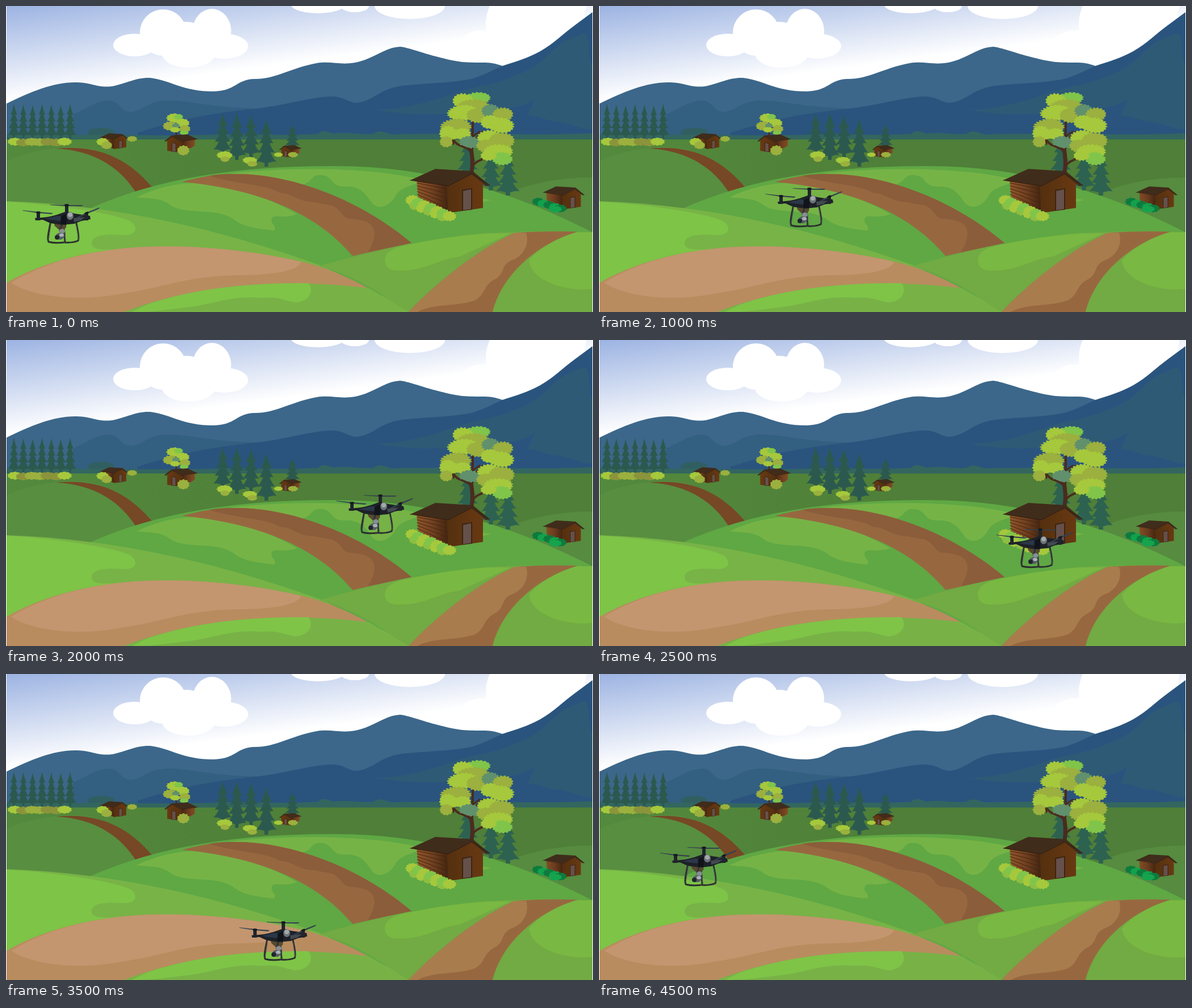
An HTML page with a canvas that plays this animation: 1035x541 px, repeating every 5000 ms.

```html
<!DOCTYPE html>
<html lang="en">
<head>
<meta charset="utf-8">
<title>Drone over the valley</title>
<style>
html, body { margin: 0; width: 100%; height: 100%; overflow: hidden; background: #fff; }
canvas { display: block; }
</style>
</head>
<body>
<canvas id="stage" width="1035" height="541"></canvas>
<script>
const W = 1035, H = 541, STEP = 500;
const ctx = document.getElementById('stage').getContext('2d');
const scene = document.createElement('canvas');
scene.width = W;
scene.height = H;
let g = scene.getContext('2d');

const fill = (color, d) => { g.fillStyle = color; g.fill(new Path2D(d)); };
const line = (color, width, d) => {
  g.strokeStyle = color;
  g.lineWidth = width;
  g.stroke(new Path2D(d));
};
const oval = (color, x, y, rx, ry, turn = 0) => {
  g.fillStyle = color;
  g.beginPath();
  g.ellipse(x, y, rx, ry, turn, 0, Math.PI * 2);
  g.fill();
};
const gradient = (x0, y0, x1, y1, ...colors) => {
  const grad = g.createLinearGradient(x0, y0, x1, y1);
  colors.forEach((c, i) => grad.addColorStop(i / (colors.length - 1), c));
  return grad;
};

// Leafy blob with a scalloped edge
function clump(color, x, y, rx, ry) {
  const n = Math.max(9, Math.round((rx + ry) / 2));
  g.fillStyle = color;
  g.beginPath();
  for (let i = 0; i <= n; i++) {
    const a = i / n * Math.PI * 2, m = a - Math.PI / n;
    const k = 0.87 + 0.06 * Math.sin(i % n * 7 + x);
    const px = x + Math.cos(a) * rx * k, py = y + Math.sin(a) * ry * k;
    if (i) g.quadraticCurveTo(x + Math.cos(m) * rx * 1.2, y + Math.sin(m) * ry * 1.2, px, py);
    else g.moveTo(px, py);
  }
  g.fill();
}
const clumps = list => list.forEach(c => clump(...c));

function pine(x, top, bottom, w, color = '#2c594e') {
  const h = bottom - top, tiers = 4;
  g.fillStyle = color;
  g.fillRect(x - w * 0.09, bottom - h * 0.2, w * 0.18, h * 0.2);
  for (let i = 0; i < tiers; i++) {
    const y0 = top + h * 0.15 * i, y1 = top + h * (0.31 + 0.195 * i);
    const r = w * (0.27 + 0.077 * i);
    g.beginPath();
    g.moveTo(x, y0);
    g.quadraticCurveTo(x + r * 0.45, y1 - h * 0.1, x + r, y1);
    g.lineTo(x + r * 0.6, y1);
    g.lineTo(x, y1 + h * 0.04);
    g.lineTo(x - r * 0.6, y1);
    g.lineTo(x - r, y1);
    g.quadraticCurveTo(x - r * 0.45, y1 - h * 0.1, x, y0);
    g.fill();
  }
}

// Log cabin, 140 x 78 units, door on the right unless mirrored
function house(x, y, s, mirror) {
  g.save();
  g.translate(x, y);
  g.scale(mirror ? -s : s, s);
  fill(gradient(12, 0, 68, 0, '#925529', '#6f4020', '#40230f'), 'M11 20L66 27L67 77L14 50Z');
  for (let i = 1; i < 6; i++) {
    line('#452512', 1, `M12 ${20 + i * 5}L66 ${27 + i * 8.5}`);
  }
  fill(gradient(65, 0, 128, 0, '#54300f', '#683912'), 'M64 28L108 6L128 25V69L67 78Z');
  fill('#3b2412', 'M91 37L109 34V72L91 74Z');
  fill('#65504b', 'M93 39L107 36V71L93 73Z');
  fill('#402c1b', 'M0 20L44 0L110 4L140 29L133 30L108 9L67 30Z');
  line('#2c1b10', 1, 'M0 20L67 30L108 9L140 29');
  g.restore();
}

function sky() {
  g.fillStyle = gradient(0, 0, 22, 165, '#9cb3e2', '#ffffff');
  g.fillRect(0, 0, W, 240);
  const clouds = [
    [227, 69, 38, 20], [277, 47, 41, 41], [363, 44, 34, 39], [318, 58, 38, 30],
    [322, 84, 47, 25], [385, 71, 42, 22], [550, -2, 47, 15], [615, 0, 25, 11],
    [712, 0, 62, 23], [840, 79, 45, 36], [934, 32, 88, 82], [985, -6, 39, 45]
  ];
  clouds.forEach(c => oval('#fff', ...c));
}

function mountains() {
  fill('#3c678a', 'M0 173C45 151 85 134 125 135C155 136 160 145 187 142C215 136 230 126 254 127C290 131 310 151 366 151C405 150 405 131 436 129C475 130 500 110 548 101C575 97 588 105 616 100C650 93 668 73 695 72C708 73 730 82 765 91S810 100 845 100Q862 100 880 108V240H0Z');
  fill('#335f81', 'M118 192C145 180 160 167 184 167C202 170 202 188 222 187C246 183 248 169 282 167C330 167 350 179 445 181V240H118Z');
  fill('#2a547e', 'M232 224C300 202 355 190 445 181C500 174 540 160 578 160C600 162 604 172 621 171C650 166 658 147 698 141C740 136 775 137 815 130C835 126 855 115 875 106C900 98 920 92 942 80C965 67 985 47 1003 34L1034 11V240H232Z');
  fill('#2e5a76', 'M652 183C690 184 735 173 780 158C830 139 855 143 900 122C955 103 962 68 996 58C1010 51 1017 47 1022 49C1032 62 1024 90 1034 105V219C1010 218 992 205 968 204C951 203 945 194 920 194L932 164C905 183 878 181 848 184C790 193 710 196 652 183Z');
}

function farLand() {
  clump('#315f61', 167, 223, 24, 8);
  fill('#33665f', 'M0 228C190 227 260 230 350 228C430 225 490 230 550 226C560 217 568 223 578 226C602 222 618 228 648 226C660 217 669 225 680 227C800 224 910 230 1034 225V238H0Z');
  fill(gradient(0, 0, W, 0, '#538a3d', '#4f7f38', '#4f7f38'), 'M0 236H1034V541H0Z');
  fill('#588e40', 'M0 274C50 253 100 247 140 251C190 258 222 292 245 324L145 360H0Z');
  fill('#764826', 'M88 252C162 245 214 268 260 323L230 331C204 290 162 256 88 252Z');
  fill('#568b40', 'M880 333C920 314 975 303 1034 303V401L960 370Z');
}

function hills() {
  fill('#5fa844', 'M145 359C270 303 415 283 570 283C740 281 890 326 1034 400V541H145Z');
  fill('#76b346', 'M230 338C270 319 310 311 350 313C413 320 475 345 513 368C488 378 470 365 468 378C467 386 478 388 473 397C435 393 416 389 400 376C371 356 315 370 290 352C272 338 253 341 230 338Z');
  fill('#76b346', 'M395 296C485 286 575 286 655 294C695 298 732 306 738 310C700 320 692 326 686 337C674 357 655 360 645 348C631 327 622 318 596 319C572 319 578 302 558 299C535 297 543 311 522 316C478 304 435 299 395 296Z');
  fill('#76b346', 'M838 340L855 343L838 347Z');
  fill('#976840', 'M310 311C340 303 370 297 400 297C500 295 625 342 715 419L611 442C545 363 440 323 310 311Z');
  fill('#8b5d3a', 'M358 300C380 297 390 297 400 297C500 295 625 342 715 419L638 435C656 407 654 385 627 379C609 374 602 381 592 367C577 347 568 354 545 347C517 348 501 329 484 331C460 315 401 315 358 300Z');

  fill('#78b347', 'M0 345C200 352 380 396 556 459L720 541H0Z');
  fill('#7dc447', 'M0 346C82 350 195 367 220 381C234 392 230 406 207 405C177 403 150 404 151 421C153 433 177 431 205 429L0 500Z');
  fill('#72aa43', 'M552 460C630 437 720 415 830 403C900 397 970 398 1034 400V541H705C660 505 610 475 552 460Z');
  fill('#79b842', 'M668 452C667 434 683 426 720 420C765 410 810 405 850 402L890 402L800 443C765 447 739 468 695 468C678 468 669 464 668 452Z');
  fill('#79b842', 'M922 450C940 427 975 409 1007 400H1034V500C992 506 926 488 922 450Z');
  fill('#976840', 'M710 541C750 498 830 430 898 401C935 398 980 398 1008 399C945 417 876 469 858 541Z');
  fill('#a97c4e', 'M710 541C750 498 830 430 898 401H917C922 415 918 437 896 448C871 456 881 471 864 482C840 493 846 512 825 521C792 532 756 525 725 541Z');

  fill('#b98c5f', 'M0 490C85 440 195 424 290 425C380 426 460 438 520 452C565 462 605 480 640 500L560 541H0Z');
  fill('#c3966f', 'M9 489C90 440 195 424 290 425C380 426 460 438 520 452C516 470 462 475 420 476C325 475 278 498 207 508C128 524 45 514 9 489Z');
  fill('#78b247', 'M208 541C330 493 485 480 640 499L710 541Z');
  fill('#7fc447', 'M246 529C325 500 430 489 533 490C543 502 537 522 510 524C490 521 481 513 452 516C397 511 362 528 324 532C284 537 257 541 222 541Z');
}

function plants() {
  const lime = '#a6c83c', olive = '#9bb03e', fresh = '#80c54a', teal = '#61906d', dry = '#8b943b', bark = '#4b2b1d';

  for (let i = 0; i < 7; i++) pine(14 + i * 16.5, 173 + i % 3, 234, 21);
  [lime, dry, olive, olive, dry, dry, lime].forEach((c, i) => {
    clump(c, 16 + i * 14.5, 240 + i % 2, 13, 7);
  });
  [[382, 190, 261, 33], [432, 193, 267, 34], [407, 189, 272, 34], [459, 200, 284, 36], [505, 210, 250, 26]]
    .forEach(p => pine(...p));

  house(166, 225, 0.36);
  clumps([[lime, 170, 240, 11, 7], [olive, 177, 246, 10, 7], [olive, 222, 235, 9, 5]]);

  line(bark, 2.5, 'M300 230L301 208M300 219L287 211M301 219L315 211');
  clumps([
    [lime, 296, 198, 14, 8], [fresh, 304, 196, 8, 5], [olive, 289, 212, 13, 8], [lime, 312, 207, 12, 8],
    [teal, 300, 212, 7, 5], [olive, 315, 217, 10, 7], [lime, 298, 219, 9, 5], [fresh, 314, 224, 8, 4]
  ]);
  house(338, 227, 0.42, true);
  clump(olive, 313, 255, 11, 9);
  house(521, 246, 0.28, true);
  [[480, 263, 8, 4], [506, 263, 9, 5], [385, 264, 14, 7], [386, 271, 8, 5], [430, 273, 13, 6], [434, 279, 9, 5]]
    .forEach((b, i) => clump(i % 2 ? olive : lime, ...b));

  pine(814, 235, 312, 42, '#2d6251');
  pine(855, 248, 326, 40, '#2d6251');
  pine(885, 260, 335, 42, '#2d6251');
  g.lineCap = 'round';
  line(bark, 7, 'M821 294C824 275 821 258 819 250');
  line(bark, 4, 'M820 258C809 244 796 251 789 236M822 255L823 200M822 284C832 269 842 275 852 261M822 240L842 222');
  clumps([
    [fresh, 832, 163, 22, 11], [lime, 806, 168, 18, 14], [olive, 824, 179, 31, 14], [lime, 806, 189, 28, 14],
    [olive, 830, 194, 18, 13], [teal, 855, 186, 17, 12], [olive, 876, 192, 18, 13], [lime, 853, 205, 17, 12],
    [lime, 873, 211, 23, 14], [olive, 793, 213, 27, 14], [lime, 780, 226, 16, 14], [olive, 777, 240, 12, 10],
    [lime, 804, 226, 16, 10], [teal, 818, 241, 19, 11], [lime, 851, 232, 20, 13], [olive, 874, 238, 22, 15],
    [olive, 849, 248, 20, 12], [lime, 868, 257, 25, 13], [fresh, 875, 270, 18, 12], [lime, 851, 265, 14, 9]
  ]);
  line(bark, 3, 'M823 230V208M819 254L804 248M789 244L788 237M824 230L835 222');

  house(713, 288, 1);
  for (let i = 0; i < 7; i++) {
    clump(i % 2 ? fresh : lime, 716 + i * 11, 343 + i * 4.8, 12, 9);
    if (i < 5) clump(i % 2 ? lime : '#8fbd42', 721 + i * 12, 353 + i * 5, 10, 8);
  }
  house(947, 319, 0.52);
  for (let i = 0; i < 5; i++) {
    clump(i % 2 ? '#12a14c' : '#0d7b3d', 938 + i * 10, 346 + i * 3, 11, 7);
  }
  clump('#16a34e', 968, 359, 12, 6);
}

// Origin is the top left corner of the craft
function drone(x, y) {
  g.save();
  g.translate(x, y);
  g.lineCap = g.lineJoin = 'round';
  line('#2c302f', 3, 'M49 36C47 48 43 61 46 68Q58 71 73 69');
  line('#2c302f', 3, 'M73 38L75 69Q89 70 98 66C101 60 97 45 95 35');
  line('#555c59', 1, 'M50 38L46 65M74 41L76 66M95 39L99 64');
  fill('#58492f', 'M55 33L78 31L77 43L66 48L57 40Z');
  line('#303638', 3, 'M69 38L66 49L73 56L68 62');
  oval('#878d93', 70, 49, 5, 4);
  oval('#555d65', 66, 58, 8, 6, -0.2);
  oval('#aab0b5', 69, 56, 4, 3);
  oval('#20252b', 61, 60, 4, 4);

  fill('#1d2127', 'M22 26C37 25 48 24 61 20L78 14L92 18L119 22L120 28L104 31L91 36L70 38L49 35L36 29L23 30Z');
  fill('#2b3748', 'M40 27L62 22L74 23L68 31L50 29Z');
  fill('#11151a', 'M68 23L79 18L77 38L67 36Z');
  oval('#6c7479', 84, 22, 6, 7);
  oval('#a3aaaa', 84, 20, 4, 4);
  fill('#434a52', 'M90 26L111 24L103 30L91 33Z');
  g.fillStyle = '#20252c';
  g.fillRect(25, 15, 6, 15);
  g.fillRect(110, 17, 6, 13);
  g.fillRect(75, 2, 6, 13);
  fill('#34404e', 'M0 12L28 15L54 17L51 19L27 17L1 13Z');
  fill('#34404e', 'M48 2L77 3L107 3L104 5L78 5L50 3Z');
  fill('#34404e', 'M95 25L113 16L136 7L134 10L115 18L98 26Z');
  oval('#161a20', 28, 16, 4, 2);
  oval('#161a20', 78, 3, 4, 2);
  oval('#161a20', 113, 17, 4, 2, -0.4);
  g.restore();
}

const stops = [
  [29, 349], [120, 318], [293, 320], [438, 292], [582, 272],
  [700, 332], [806, 413], [411, 436], [17, 455], [107, 304]
];

sky();
mountains();
farLand();
hills();
plants();
g.fillStyle = '#fff';
g.fillRect(0, 0, 1, H);
g.fillRect(W - 1, 0, 1, H);

g = ctx;
const start = performance.now();
function draw(now) {
  const t = Math.max(0, now - start);
  const [x, y] = stops[Math.floor(t / STEP) % stops.length];
  g.drawImage(scene, 0, 0);
  drone(x, y);
  requestAnimationFrame(draw);
}
draw(start);
</script>
</body>
</html>
```
